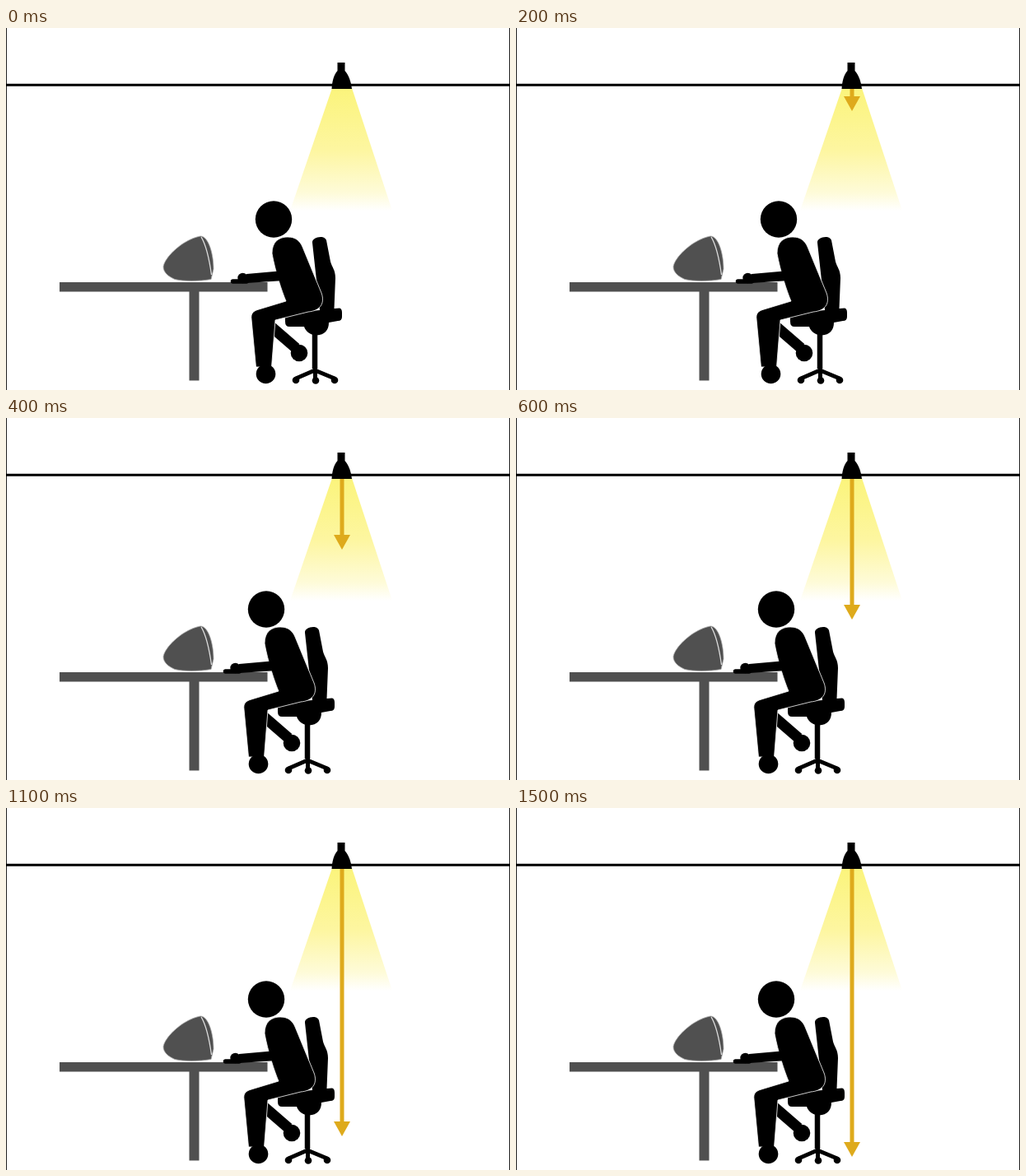
Recreate the animation shown at these times as an HTML page. Size 612x440 px, loop 2.8 s.

```html
<!DOCTYPE html>
<html lang="en">
<head>
<meta charset="utf-8">
<title>Desk light</title>
<style>
html, body { margin: 0; width: 100%; height: 100%; overflow: hidden; background: #fff; }
svg { display: block; width: 612px; height: 440px; }
</style>
</head>
<body>
<svg viewBox="0 0 612 440">
  <defs>
    <linearGradient id="glow" gradientUnits="userSpaceOnUse" x1="0" y1="74" x2="0" y2="222">
      <stop offset="0" stop-color="#fbf47c"/>
      <stop offset=".5" stop-color="#fdf6a0"/>
      <stop offset=".85" stop-color="#fefbd8"/>
      <stop offset="1" stop-color="#fff"/>
    </linearGradient>
  </defs>

  <!-- room and light -->
  <path d="M.5 0V440M611.5 0V440" stroke="#222"/>
  <path d="M0 69.3H612" stroke="#000" stroke-width="3"/>
  <path d="M396 73H420L469 222H345Z" fill="url(#glow)"/>

  <!-- desk and computer -->
  <g fill="#505050">
    <path d="M65 309H317.5V320.5H234.5V428.5H222.5V320.5H65Z"/>
    <path d="M191 290C193 278 215 257 236 253C246 253 252 275 252 293L249 305.5C235 308 215 308 205 305.5C197 302 191 297 191 290Z" stroke="#aaa" stroke-width=".8"/>
    <path d="M237 254C243 264 247 282 249.500 300" fill="none" stroke="#ddd" stroke-width="1.3"/>
  </g>

  <g id="worker">
    <!-- chair -->
    <path d="M363 261C362 254 378 251 380 258L385 284C387 291 391 294 391 304L389.500 341L396 340.500Q399 341 399 346V351Q399 356 394 356L383 358C383 367 378 373 368 373.500C360 373 355 369 353 363H335Q330 363 330 357V350Q330 346 336 346L372 343Z"/>
    <path d="M366 372V414" stroke="#000" stroke-width="6.500"/>
    <path d="M343 426L366 416L390 426M366.500 414V427" fill="none" stroke="#000" stroke-width="5" stroke-linejoin="round"/>
    <circle cx="343" cy="428" r="4.300"/>
    <circle cx="367" cy="428.500" r="4.300"/>
    <circle cx="390" cy="428" r="4.300"/>
    <!-- person -->
    <path d="M313 363L343 389" stroke="#000" stroke-width="13"/>
    <circle cx="347" cy="395" r="10.300"/>
    <path d="M314 274C314 260 322 254 333 254C343 254 348 259 351 266L374 322C379 336 371 344 358 345L318 355L313.500 412H294.500L289 354C288 347 291 344 298 342L331 332C326 320 318 296 314 274Z" stroke="#fff" stroke-width=".8"/>
    <circle cx="306.500" cy="420.500" r="11.800"/>
    <path d="M328 295L283 299V310L328 307Z"/>
    <circle cx="278.500" cy="304" r="6.200"/>
    <path d="M266.500 308H283" stroke="#000" stroke-width="5.500" stroke-linecap="round"/>
    <circle cx="316" cy="232.500" r="22.200"/>
  </g>

  <g id="arrow" fill="#deaa1c">
    <rect id="shaft" x="405.500" y="73" width="5"/>
    <path id="head" d="M398 -18H418L408 0Z"/>
  </g>
  <path d="M402.500 42H411.500V52C416 57 419 65 420 74H395.500C396 65 398 57 402.500 52Z"/>
</svg>
<script>
const $ = id => document.getElementById(id);
const STEP = 100, LOOP = 2800;
// height of the arrow tip after each step
const tips = [0, 80, 101, 127, 160, 201, 245, 287, 323, 356, 381, 399, 412, 419, 423, 424];

function draw(now) {
  const step = Math.floor(now % LOOP / STEP);
  const tip = tips[Math.min(step, tips.length - 1)];
  const slide = Math.round(9 * Math.max(0, 1 - step / 5) ** 2);
  $('worker').setAttribute('transform', `translate(${slide})`);
  $('arrow').style.display = tip ? '' : 'none';
  $('shaft').setAttribute('height', Math.max(0, tip - 90));
  $('head').setAttribute('transform', `translate(0 ${tip})`);
}

const start = performance.now();
function tick() {
  draw(performance.now() - start);
  requestAnimationFrame(tick);
}
tick();
</script>
</body>
</html>
```
